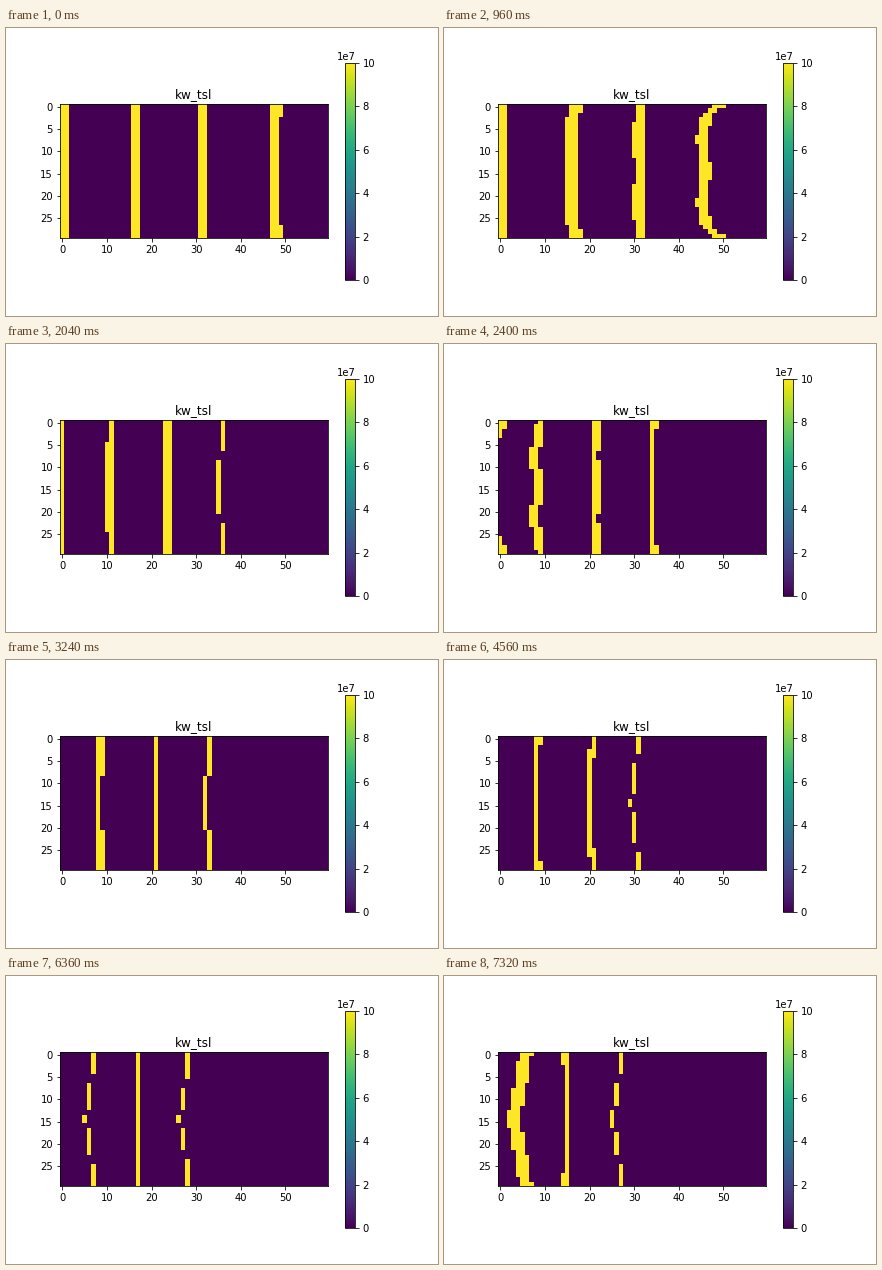
A matplotlib script that plays this animation: 432 by 288 pixels, repeating every 8000 ms.

```python
import numpy as np
import matplotlib.pyplot as plt
from matplotlib.animation import FuncAnimation

plt.rcParams.update({
    "font.family": "DejaVu Sans",
    "font.size": 10,
    "figure.subplot.bottom": 0.125,
    "figure.subplot.top": 0.88,
})

ROWS, COLS = 30, 60
PEAK = 1e8
INTERVAL, LOOP = 40, 8000

# Times at which the simulation shows a new picture.
STEPS = np.r_[0, 120, 480:1081:120, 1320:1681:120, 2040, 2400, 2520,
              2760, 3240, 3840, 4560, 5400, 6360, 7320]

# Key points of each wave front: ms, column at mid height, bow, half width.
WAVES = [
    [(1080, 0.5, 0, 1), (1440, 0, 0, 0.5), (2040, 0, 0, 0.5),
     (2400, -5.5, 5.7, 0.68), (2760, -7.9, 5.7, 0.68)],
    [(240, 16.5, 0, 1), (960, 15.9, 1.1, 1.45), (1560, 14, 0, 0.5),
     (2400, 7.8, 0.7, 0.95), (4560, 8, 0.484, 0.55), (5400, 8, 0, 0.5),
     (6360, 5.13, 1.92, 0.39), (7320, 2.5, 3.2, 1.4)],
    [(240, 31.5, 0, 1), (960, 31.14, 0, 1.2), (1560, 26, 0, 0.5),
     (2400, 21.47, 0, 0.97), (4560, 19.72, 0.95, 0.55), (6360, 17, 0, 0.5),
     (7320, 14.91, -0.4, 0.56)],
    [(240, 47.2, 0.78, 1.15), (960, 45.55, 2.98, 1.3),
     (1560, 36.38, 1.78, 0.343), (2400, 33.97, 0.1, 0.55),
     (4560, 29.16, 1.74, 0.406), (6360, 26.09, 2.15, 0.375),
     (7320, 24.87, 2.28, 0.373)],
]

cols = np.arange(COLS)
mid_row = (ROWS - 1) / 2
distance = np.abs(np.arange(ROWS) - mid_row)


def field(ms):
    """Light every cell that lies within a bent, rippled front."""
    ms = STEPS[STEPS <= ms].max()
    power = np.interp(ms, (240, 960, 1560), (1, 8, 0.7))
    ripple = np.interp(ms, (240, 960, 1560, 2040, 2400, 2760),
                       (0, 0.3, 0, 0, 0.48, 0))
    bend = (distance / mid_row) ** power
    wobble = ripple * np.cos(2 * np.pi * distance / 14)
    lit = np.zeros((ROWS, COLS), bool)
    for keys in WAVES:
        times, *tracks = zip(*keys)
        column, bow, half = (np.interp(ms, times, track) for track in tracks)
        front = column + bow * bend + wobble
        lit |= np.abs(cols - front[:, None]) < half
    return lit * PEAK


fig, ax = plt.subplots(figsize=(6, 4), dpi=72, facecolor="white")
image = ax.imshow(field(0), vmin=0, vmax=PEAK, cmap="viridis",
                  interpolation="nearest")
ax.set_title("kw_tsl", fontsize=12)
bar = fig.colorbar(image, ax=ax)
bar.formatter.set_powerlimits((7, 7))
bar.ax.yaxis.set_offset_position("right")


def update(frame):
    image.set_data(field(frame * INTERVAL))
    return image,


animation = FuncAnimation(fig, update, frames=LOOP // INTERVAL,
                          interval=INTERVAL, repeat=True, repeat_delay=0)
plt.show()
```
